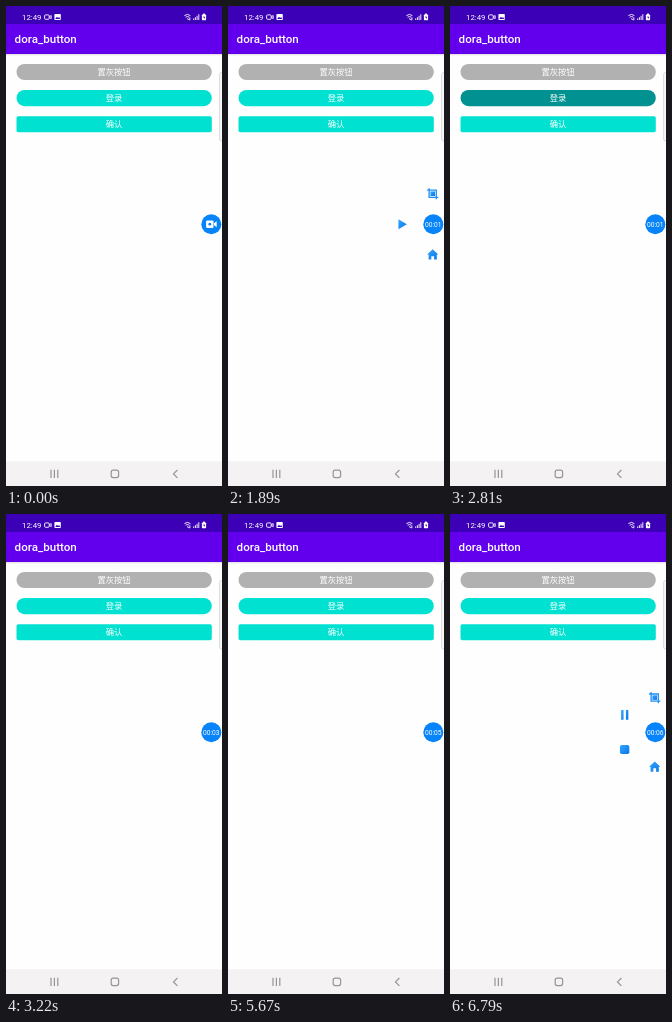
Recreate the animation shown at these times as an HTML page. Size 216 by 480 pixels, loop 6890 ms.

```html
<!DOCTYPE html>
<html lang="zh-CN">
<head>
<meta charset="utf-8">
<title>dora_button</title>
<style>
  html, body { margin: 0; width: 100%; height: 100%; overflow: hidden; background: #fefefe; }
  svg { display: block; width: 100vw; height: 100vh; }
  text { fill: #fff; font-family: Roboto, sans-serif; }
  .title { font-size: 11.6px; font-weight: 500; }
  .clock { font-size: 7.8px; }
  .label { font: 8.3px "Noto Sans CJK SC", "Noto Sans CJK", sans-serif; text-anchor: middle; }
  .timer { font-size: 6.7px; text-anchor: middle; }
  .line { fill: none; stroke: #fff; stroke-width: .9; }
  .nav { fill: none; stroke: #969596; stroke-width: 1.2; }
  .btn { fill: #00e1d1; }
  .btn.down { fill: #009190; }
</style>
</head>
<body>
<svg viewBox="0 0 216 480" preserveAspectRatio="none">
  <defs>
    <linearGradient id="shade" x2="0" y2="1">
      <stop stop-color="#000" stop-opacity=".2"/>
      <stop offset="1" stop-color="#000" stop-opacity="0"/>
    </linearGradient>
    <linearGradient id="blue" x2="1" y2="1">
      <stop stop-color="#35a5ff"/>
      <stop offset="1" stop-color="#0877e8"/>
    </linearGradient>
  </defs>

  <rect width="216" height="480" fill="#fefefe"/>
  <rect y="47" width="216" height="3" fill="url(#shade)"/>
  <rect width="216" height="48" fill="#6200ee"/>
  <rect width="216" height="18" fill="#3c00b6"/>

  <!-- status bar -->
  <text class="clock" x="16" y="13.8">12:49</text>
  <g class="line">
    <rect x="38.6" y="8.9" width="4.6" height="4.4" rx="1"/>
    <path d="M43.4 10.6l1.8-1v3l-1.8-1"/>
    <path d="M178.4 9.6q3-2.4 6 0M179.6 11.2q1.9-1.3 3.8 0M181 12.6l2.8 1.4M183.9 11.5v2.4"/>
    <path d="M187.7 14v-1.6M189.4 14v-2.8M191.1 14v-4.2M192.8 14V8.2"/>
  </g>
  <g fill="#fff">
    <rect x="48.4" y="8" width="6.4" height="6" rx=".8"/>
    <path d="M49.2 13l1.7-2.3 1.2 1.3 1-1 1.1 2z" fill="#3c00b6"/>
    <rect x="195.9" y="8.5" width="4.2" height="5.7" rx=".8"/>
    <rect x="197" y="7.6" width="2" height="1.4"/>
    <path d="M198.3 9.6l-1.2 1.9h.9v1.5l1.2-2h-.9z" fill="#3c00b6"/>
  </g>
  <text class="title" x="8.6" y="37.4">dora_button</text>

  <!-- buttons -->
  <rect x="10.5" y="58" width="195.3" height="16" rx="8" fill="#b2b1b2"/>
  <rect class="btn" id="login" x="10.5" y="84" width="195.3" height="16.2" rx="8.1"/>
  <rect class="btn" id="ok" x="10.5" y="110.3" width="195.3" height="16" rx="1.8"/>
  <text class="label" x="108" y="69.1">置灰按钮</text>
  <text class="label" x="108" y="95.2">登录</text>
  <text class="label" x="108" y="121.4">确认</text>

  <rect x="213.6" y="66.5" width="8" height="68.5" rx="2" fill="#f7f7f7" stroke="#d2d2d2" stroke-width=".8"/>

  <!-- navigation bar -->
  <rect y="455.3" width="216" height="25" fill="#f4f2f3"/>
  <g class="nav">
    <path d="M45 463.8v8.2M48.4 463.8v8.2M51.8 463.8v8.2"/>
    <rect x="105.2" y="464.2" width="7.4" height="7.4" rx="2"/>
    <path d="M171.4 464l-3.9 3.9 3.9 3.9"/>
  </g>

  <!-- floating recorder -->
  <g id="menu" fill="url(#blue)">
    <g data-angle="-90">
      <path d="M-3.6-5.6V3.6H5.6M-5.6-3.6H3.6V5.6" fill="none" stroke="#1e90f5" stroke-width="1.3"/>
      <rect x="-2.3" y="-2.3" width="4.6" height="4.6"/>
    </g>
    <path data-angle="90" d="M0-5.3L5.6-.1H4.1V4.9H1.4V1.5H-1.4V4.9H-4.1V-.1H-5.6Z"/>
    <path data-angle="180" data-mode="idle" d="M-3.8-5L4.6 0-3.8 5Z"/>
    <path data-angle="-150" data-mode="rec" d="M-3.6-4.8h2.4v9.6h-2.4zM1.2-4.8h2.4v9.6h-2.4z"/>
    <rect data-angle="150" data-mode="rec" x="-4.8" y="-4.6" width="9.4" height="9.2" rx="1.8"/>
  </g>
  <g id="bubble">
    <circle r="10" fill="#0784fa"/>
    <g id="camera" fill="#fff">
      <rect x="-5.2" y="-3.8" width="7.4" height="7.6" rx="1.2"/>
      <path d="M2.6-.9L5.4-3V3L2.6.9Z"/>
      <circle cx="-1.5" r="1.4" fill="#0784fa"/>
    </g>
    <text class="timer" id="timer" y="2.4"></text>
  </g>
</svg>
<script>
  const LOOP = 6890, CX = 205.3, CY = 218.2, REACH = 34.6;
  const $ = id => document.getElementById(id);
  const icons = [...$('menu').querySelectorAll('[data-angle]')];

  // [start time, value] steps; each value holds until the next
  const seconds = [[0, -1], [180, 0], [1190, 1], [2860, 2], [3220, 3], [4090, 4], [5670, 5], [6190, 6]];
  const spread = [[0, 0], [90, .35], [180, .8], [270, 1], [1890, .88], [1990, .6], [2065, .3], [2140, 0],
                  [6190, .35], [6270, .8], [6350, 1]];
  const shift = [[0, 0], [3570, 10.7], [5670, 0]];

  const at = (steps, t) => steps.findLast(([start]) => t >= start)[1];
  const show = (el, on) => el.setAttribute('visibility', on ? 'visible' : 'hidden');
  const place = (el, x, y, s = 1) => el.setAttribute('transform', `translate(${x} ${y}) scale(${s})`);
  const press = (id, on) => $(id).classList.toggle('down', on);

  function draw(t) {
    const sec = at(seconds, t), k = at(spread, t);
    const mode = t < 3000 ? 'idle' : 'rec';

    for (const el of icons) {
      const { angle, mode: own } = el.dataset, a = angle * Math.PI / 180;
      const gap = REACH * k;
      place(el, CX - .6 + gap * Math.cos(a), CY + gap * Math.sin(a), Math.min(1, .4 + .7 * k));
      show(el, k > 0 && (!own || own === mode));
    }
    place($('bubble'), CX + at(shift, t), CY);
    show($('camera'), sec < 0);
    $('timer').textContent = sec < 0 ? '' : '00:0' + sec;
    press('login', t >= 2810 && t < 2860);
    press('ok', t >= 3140 && t < 3220);
  }

  const begin = performance.now();
  function tick() {
    draw((performance.now() - begin) % LOOP);
    requestAnimationFrame(tick);
  }
  tick();
</script>
</body>
</html>
```
